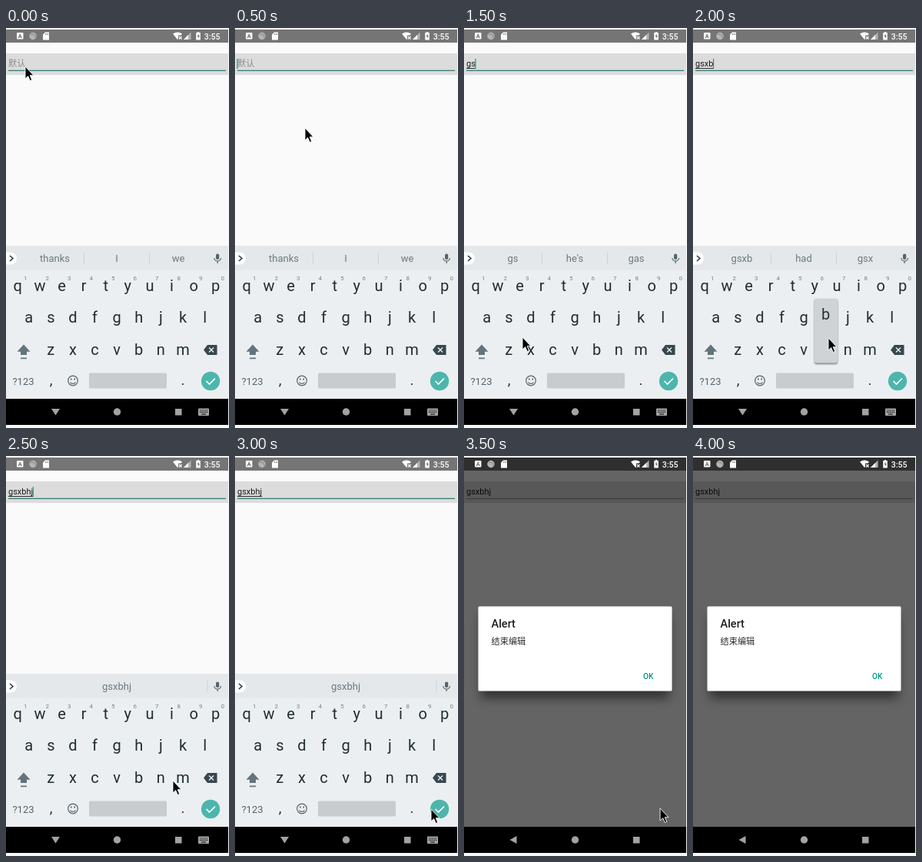
An HTML page for the animation above (4.5 s loop, 290 by 520 pixels).

```html
<!DOCTYPE html>
<html lang="zh">
<head>
<meta charset="utf-8">
<style>
  html, body { margin: 0; width: 290px; height: 520px; overflow: hidden; background: #f7f7f7; }
  svg { display: block; }
  text { font-family: Roboto, "Noto Sans CJK SC", "Noto Sans CJK", sans-serif; white-space: pre; }
  .mid { text-anchor: middle; }
</style>
</head>
<body>
<svg id="stage" width="290" height="520" viewBox="0 0 290 520">
  <defs>
    <filter id="soft" x="-30%" y="-30%" width="160%" height="180%"><feGaussianBlur stdDeviation="7"/></filter>
    <filter id="lift" x="-30%" y="-30%" width="160%" height="160%"><feGaussianBlur stdDeviation="1.2"/></filter>
    <clipPath id="screen"><rect y="2" width="289" height="514"/></clipPath>
  </defs>
  <g clip-path="url(#screen)">
    <rect y="2" width="289" height="514" fill="#fafafa"/>
    <rect y="33" width="289" height="28" fill="#dcdcdc"/>
    <rect id="line" x="3" width="283"/>
    <text id="hint" x="3" y="50" font-size="11.2" fill="#8c8c8c">默认</text>
    <text id="typed" x="3" y="50" font-size="11" fill="#1c1c1c"></text>
    <rect id="composing" x="3" y="52" height="1" fill="#333"/>
    <rect id="caret" y="40" width="1.2" height="13" fill="#16998c"/>
    <rect y="2" width="289" height="17" fill="#757575"/>

    <g id="keyboard">
      <rect y="283" width="289" height="32" fill="#e4e8ea"/>
      <rect y="314.5" width="289" height="168" fill="#eceff1"/>
      <g id="keyInk">
        <path d="M0 291.5H6A8 8 0 0 1 6 307.5H0Z" fill="#fff"/>
        <path d="M5 296l4 3.5-4 3.5" fill="none" stroke="#263238" stroke-width="1.5"/>
        <g id="words" class="mid" font-size="13" fill="#6c797f"></g>
        <path id="dividers" stroke="#cdd2d5" stroke-width="1"/>
        <g fill="none" stroke="#56646b" stroke-width="1.2">
          <rect x="273.6" y="294" width="3" height="6.5" rx="1.5" fill="#56646b"/>
          <path d="M270.8 299a4.3 4 0 0 0 8.6 0M275.1 303v3"/>
        </g>
        <g id="keys" class="mid" font-size="20" fill="#1f2d33"></g>
        <g id="digits" class="mid" font-size="8" fill="#75828a"></g>
        <path d="M23 411.5l8.5 9.3h-4.5v4.2h-8v-4.2h-4.500zM19 428.600h8v1.600h-8z" fill="#64747c"/>
        <path d="M257 418.500l5-6.500h12.500v13h-12.500z" fill="#37474f"/>
        <path d="M264 415.500l6 6m0-6l-6 6" stroke="#eceff1" stroke-width="1.400"/>
        <g class="mid" fill="#54636b">
          <text x="22.500" y="464" font-size="13">?123</text>
          <text x="58.500" y="464" font-size="19" fill="#263238">,</text>
          <text x="230" y="464" font-size="19" fill="#263238">.</text>
        </g>
        <g fill="none" stroke="#54636b" stroke-width="1.200">
          <circle cx="87" cy="458.500" r="6.300"/>
          <path d="M83.500 460.500a3.800 3.200 0 0 0 7 0"/>
          <path d="M84.800 455.500v2M89.200 455.500v2" stroke-width="1.600"/>
        </g>
        <rect x="108" y="448.500" width="101" height="20" rx="1.500" fill="#c8ccce"/>
      </g>
      <circle id="enter" cx="266" cy="459" r="12.200"/>
      <path d="M260.500 459l4 4 7.500-7.500" fill="none" stroke="#fff" stroke-width="1.700"/>
      <g id="popup">
        <rect x="-14.500" y="353" width="30" height="84" rx="3" fill="#777" filter="url(#lift)"/>
        <rect x="-14.500" y="352" width="30" height="83.500" rx="3" fill="#cfd3d5"/>
        <text id="popupKey" class="mid" y="379" font-size="20" fill="#263238"></text>
      </g>
    </g>

    <g id="dialog">
      <rect y="2" width="289" height="514" fill="#000" opacity=".6"/>
      <rect x="22" y="207" width="245" height="108" fill="#000" opacity=".5" filter="url(#soft)"/>
      <rect x="18.500" y="195.500" width="252" height="110" rx="1.500" fill="#fff"/>
      <text x="35.500" y="223" font-size="14.500" font-weight="500" fill="#1d1d1d">Alert</text>
      <text x="35.500" y="244.500" font-size="11.200" fill="#2a2a2a">结束编辑</text>
      <text x="233" y="290" font-size="10" font-weight="500" fill="#009688">OK</text>
    </g>

    <g fill="#fff">
      <rect x="14" y="6" width="8.500" height="8.500" rx="1"/>
      <text class="mid" x="18.250" y="13" font-size="7.500" font-weight="700" fill="#666">A</text>
      <circle cx="35" cy="10.500" r="4.700" fill="#b5b5b5"/>
      <path d="M32 8.500a4 4 0 0 1 6 4" fill="none" stroke="#929292" stroke-width="1.500"/>
      <path d="M51 5.500h5v10h-8v-7z"/>
      <path d="M51.300 7v2M53 7v2M54.700 7v2" stroke="#777" stroke-width=".8"/>
      <path d="M217 7.500q6-4 12 0l-1.500 2h-3.500v4.500l-1 1z"/>
      <path d="M225 11l3.500 3.500m0-3.500l-3.500 3.500" stroke="#fff" stroke-width="1.200"/>
      <path d="M240.500 5.500v9.500h-9.500z" fill="#b4b4b4"/>
      <path d="M237 9v6h-6z"/>
      <path d="M249 5h2v1h1.800v9.500h-5.600v-9.500h1.800z"/>
      <path d="M250.500 7.500l-1.800 3.500h1.300v2.500l1.800-3.500h-1.300z" fill="#666"/>
      <text x="257.800" y="14.500" font-size="10.500" font-weight="500">3:55</text>
    </g>

    <rect id="sliver" y="482" width="289" height="8" fill="#b9bcbd"/>
    <rect id="nav" width="289" height="34" fill="#000"/>
    <g fill="#a3a3a3">
      <path id="back"/>
      <circle cx="144.500" cy="499" r="4.700"/>
      <rect x="220" y="495" width="8.500" height="8.500"/>
      <g id="keyboardIcon">
        <rect x="250" y="494.500" width="14" height="9.500" rx="1"/>
        <path d="M252 497h10.500M252 499.300h10.500" stroke="#000" stroke-width="1.200" stroke-dasharray="1.200 1"/>
        <path d="M254 502h6" stroke="#000"/>
      </g>
    </g>
  </g>
  <path id="pointer" d="M0 0V16L3.700 12.600 6.200 18.500 8.700 17.400 6.200 11.700H11Z" fill="#000" stroke="#fff" stroke-width=".9"/>
</svg>
<script>
const $ = id => document.getElementById(id);
const STEP = 250, LOOP = 4500;
const TYPED = "gsxbhj", FIRST_KEY = 5, SLIDE = 13, ALERT = 14;
const WORD_X = [63.5, 144, 224];

// Pointer tip at each step; it is gone once the dialog is confirmed.
const pointerPath = [
  [25, 50], [14, 41], [91, 130], [185, 361], [151, 388], [64, 384],
  [76, 402], [90, 405], [176, 403], [184, 384], [217, 422], [239, 449],
  [255, 459], [255, 459], [255, 458], [239, 261]
];
const suggestions = [
  ["thanks", "I", "we"], ["g", "good", "go"], ["gs", "he's", "gas"],
  ["gsx", "had", "gax"], ["gsxb", "had", "gsx"], ["gsxbh", "had", "gsx"], ["gsxbhj"]
];
const popups = { 7: ["x", 87], 8: ["b", 172.5] };

function addText(parent, x, y, content) {
  const node = document.createElementNS("http://www.w3.org/2000/svg", "text");
  node.setAttribute("x", x);
  node.setAttribute("y", y);
  node.textContent = content;
  parent.append(node);
}

function set(id, attributes) {
  for (const [name, value] of Object.entries(attributes)) $(id).setAttribute(name, value);
}

function show(id, visible) {
  $(id).style.display = visible ? "" : "none";
}

[["qwertyuiop", 15.3, 342], ["asdfghjkl", 29.8, 383], ["zxcvbnm", 58.3, 424.5]].forEach(([row, x, y]) => {
  [...row].forEach((key, i) => addText($("keys"), x + i * 28.6, y, key));
});
[..."1234567890"].forEach((digit, i) => addText($("digits"), 25.3 + i * 28.5, 328, digit));

function draw(step) {
  const count = Math.max(0, Math.min(TYPED.length, step - FIRST_KEY + 1));
  const sliding = step === SLIDE, alert = step >= ALERT, focused = step < SLIDE;

  $("typed").textContent = TYPED.slice(0, count);
  const width = count ? $("typed").getComputedTextLength() : 0;
  show("hint", !count);
  show("composing", count && focused);
  set("composing", { width });
  show("caret", step === 1 || step === 2 || (step >= FIRST_KEY && step < 12));
  set("caret", { x: 2.5 + width });
  set("line", focused
    ? { y: 54.7, height: 1.3, fill: "#387d7a" }
    : { y: 55, height: 1, fill: "#8c8c8c" });

  const words = suggestions[count];
  $("words").replaceChildren();
  words.forEach((word, i) => addText($("words"), words.length > 1 ? WORD_X[i] : 144, 304, word));
  set("dividers", { d: words.length > 1 ? "M101.5 292v15M186.5 292v15" : "M262 292v15" });

  show("keyboard", !alert);
  set("keyboard", { transform: `translate(0 ${sliding ? 7.5 : 0})`, opacity: sliding ? .9 : 1 });
  set("keyInk", { opacity: sliding ? .9 : 1 });
  set("enter", { fill: sliding ? "#2eb0ac" : "#4db6ac" });
  const popup = popups[step];
  show("popup", popup);
  if (popup) {
    $("popupKey").textContent = popup[0];
    set("popup", { transform: `translate(${popup[1]} 0)` });
  }

  show("dialog", alert);
  show("sliver", sliding);
  set("nav", { y: sliding ? 489 : 482 });
  set("back", { d: focused ? "M59 495h11l-5.500 8.500z" : "M68.500 494v10l-9-5z" });
  show("keyboardIcon", focused);

  const tip = pointerPath[step];
  show("pointer", tip);
  if (tip) set("pointer", { transform: `translate(${tip})` });
}

const start = performance.now();
let current = -1;
function tick() {
  const step = Math.floor((performance.now() - start) % LOOP / STEP);
  if (step !== current) draw(current = step);
  requestAnimationFrame(tick);
}
tick();
</script>
</body>
</html>
```
